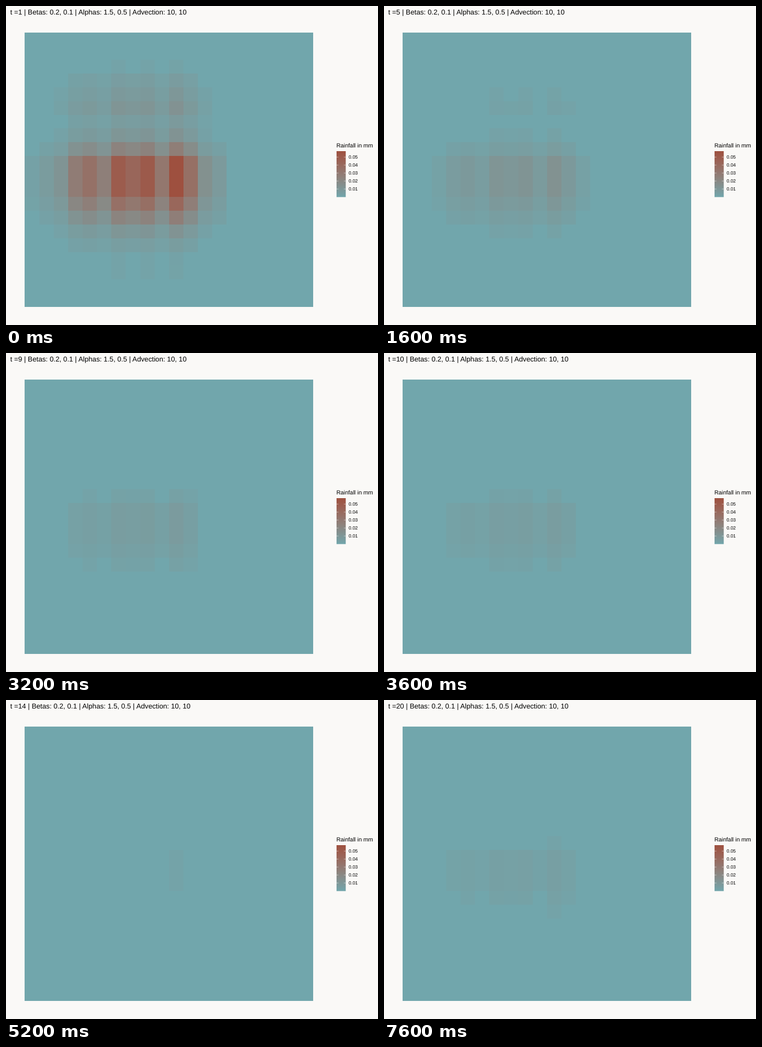
An HTML page for the animation above (8 s loop, 700 by 600 pixels).

```html
<!DOCTYPE html>
<html lang="en">
<head>
<meta charset="utf-8">
<title>Rainfall grid</title>
<style>
html, body { margin: 0; width: 100%; height: 100%; overflow: hidden; background: #faf9f7; }
svg { display: block; width: 700px; height: 600px; }
text {
  font-family: "Liberation Sans", Arial, sans-serif;
  fill: #000;
  white-space: pre;
  text-rendering: geometricPrecision;
}
</style>
</head>
<body>
<svg viewBox="0 0 700 600">
  <defs><linearGradient id="ramp" x1="0" y1="1" x2="0" y2="0"></linearGradient></defs>
  <text id="title" x="8" y="15.5" font-size="13.2"></text>
  <g id="grid" shape-rendering="crispEdges"></g>
  <g id="legend">
    <text x="621.7" y="266" font-size="10.9">Rainfall in mm</text>
    <rect x="622" y="273" width="17.3" height="86.4" fill="url(#ramp)"/>
  </g>
</svg>
<script>
const STEP = 400, COUNT = 20, CUT = 0.034;
const LOW = [113, 166, 172], HIGH = [158, 80, 63], BUMP = [9, 0, -2];

// Each cell's strength is column * row * level at that time.
const cols = [.055, .12, .21, .49, .62, .45, .86, .74, .88, .55, 1, .63, .25, .14];
const rows = [.01, .025, .04, .115, .17, .23, .14, .22, .47, 1, 1, 1, .73, .46, .22, .11, .042, .04];
const levels = [[1, 1], [2, .5], [5, .235], [9, .125], [10, .105], [14, .037], [20, .08]];

const byId = id => document.getElementById(id);
const edgeX = i => Math.round(35.35 + i * 27.15);
const edgeY = j => Math.round(49.8 + j * 25.8);

function add(parent, tag, attrs, text = "") {
  const el = document.createElementNS("http://www.w3.org/2000/svg", tag);
  for (const key in attrs) el.setAttribute(key, attrs[key]);
  el.textContent = text;
  parent.append(el);
  return el;
}

// Approximates a Lab blend by lifting the middle of an RGB blend.
function shade(v) {
  const rgb = LOW.map((c, i) => Math.round(c + (HIGH[i] - c) * v + 4 * v * (1 - v) * BUMP[i]));
  return `rgb(${rgb})`;
}

function level(t) {
  const i = Math.max(1, levels.findIndex(([time]) => time >= t));
  const [t0, a] = levels[i - 1], [t1, b] = levels[i];
  return a * (b / a) ** ((t - t0) / (t1 - t0));
}

add(byId("grid"), "rect", { x: 35, y: 50, width: 543, height: 516, fill: shade(0) });

const cells = [];
rows.forEach((row, j) => cols.forEach((col, i) => {
  const x = edgeX(i), y = edgeY(j);
  const el = add(byId("grid"), "rect", { x, y, width: edgeX(i + 1) - x, height: edgeY(j + 1) - y });
  cells.push({ el, weight: row * col });
}));

for (let i = 0; i <= 10; i++) {
  add(byId("ramp"), "stop", { offset: i / 10, "stop-color": shade(i / 10) });
}
for (let i = 1; i <= 5; i++) {
  const y = 359.2 - i * 15;
  add(byId("legend"), "path", {
    d: `M622 ${y}h3.5M635.8 ${y}h3.5`, stroke: "#fff", "stroke-width": .5
  });
  add(byId("legend"), "text", { x: 644.8, y: y + 3.2, "font-size": 8.8 }, `0.0${i}`);
}

let shown = 0;
function draw(now) {
  const t = Math.floor(now / STEP) % COUNT + 1;
  if (t === shown) return;
  shown = t;
  byId("title").textContent = `t =${t} | Betas: 0.2, 0.1 | Alphas: 1.5, 0.5 | Advection: 10, 10`;
  const amp = level(t);
  for (const { el, weight } of cells) {
    const v = weight * amp;
    el.setAttribute("fill", shade(v < CUT ? 0 : v));
  }
}

const start = performance.now();
function tick() {
  draw(performance.now() - start);
  requestAnimationFrame(tick);
}
tick();
</script>
</body>
</html>
```
